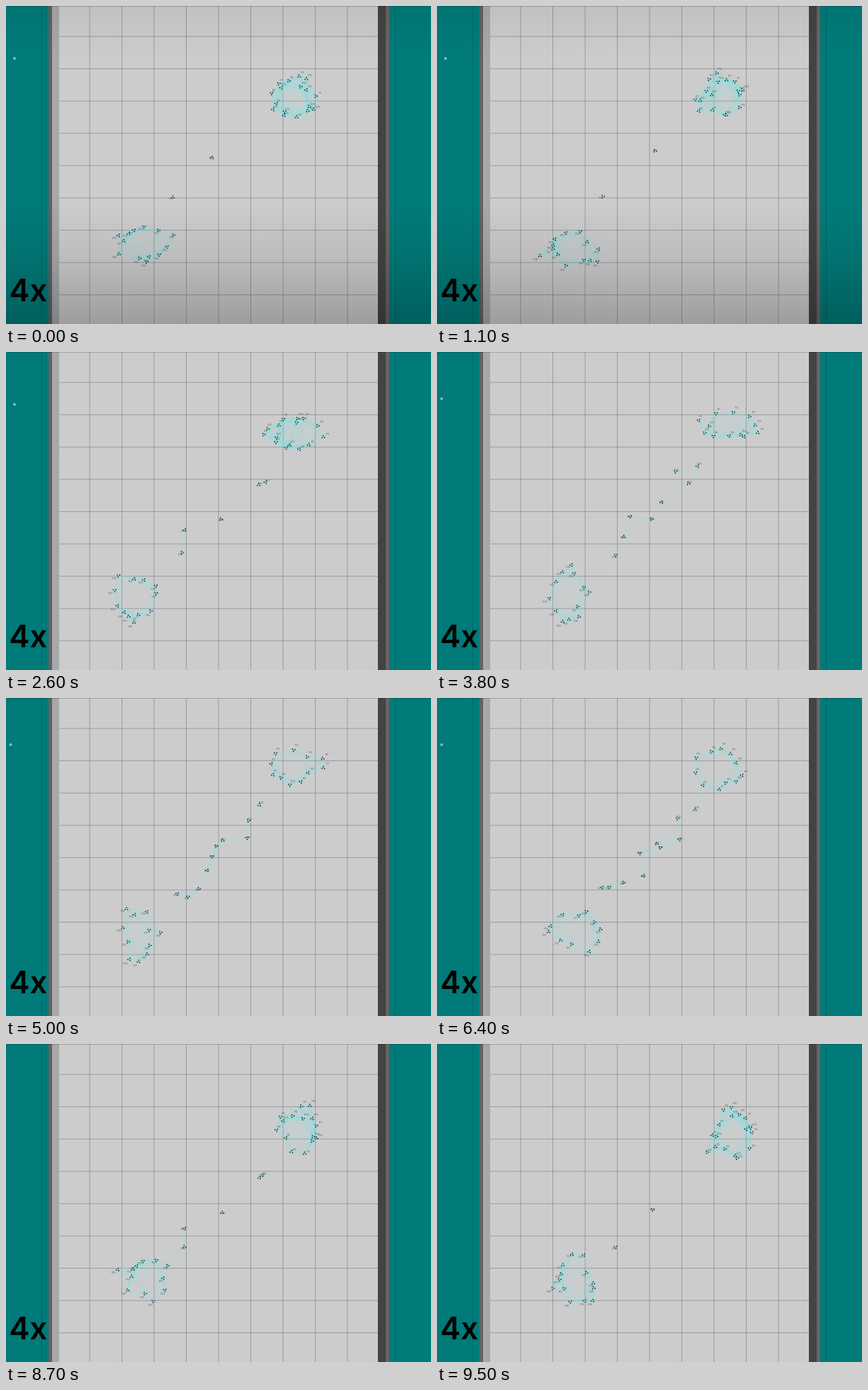
Recreate the animation shown at these times as an HTML page with a canvas. Size 600 by 449 pixels, loop 9600 ms.

```html
<!DOCTYPE html>
<html lang="en">
<head>
<meta charset="utf-8">
<title>Robot swarm</title>
<style>
  html, body { margin: 0; width: 100%; height: 100%; overflow: hidden; background: #007b79; }
  canvas { display: block; }
</style>
</head>
<body>
<canvas width="600" height="449"></canvas>
<script>
const W = 600, H = 449, LOOP = 9600, STEP = 100;
const FLOCK = 11, CHAIN = 10, RANGE = 47, TURN = 2 * Math.PI;
const ctx = document.querySelector('canvas').getContext('2d');
const lerp = (a, b, u) => a + (b - a) * u;
const clamp = u => Math.max(0, Math.min(1, u));
const smooth = u => u * u * (3 - 2 * u);
const wave = (t, mid, amp, peak, period = LOOP) => mid + amp * Math.cos(TURN * (t - peak) / period);

let seed = 7;
function random() {
  seed = (seed * 16807) % 2147483647;
  return seed / 2147483647;
}

const member = () => ({ angle: random() * TURN, reach: 0.45 + 0.65 * Math.sqrt(random()), phase: random() * TURN });
const flocks = [0, 1].map(() => Array.from({ length: FLOCK }, (_, i) => {
  const m = member();
  m.angle = (i + m.angle / TURN) / FLOCK * TURN;
  return m;
}));
// Chain members fill their places along the way from bottom to top in scattered order.
const chain = Array.from({ length: CHAIN }, (_, rank) => ({ ...member(), rank, place: (0.08 + rank * 0.38) % 1 }));

// The two flocks drift and breathe: wide when flat, narrow when tall.
function flockShapes(t) {
  const topHeight = wave(t, 28, 7, 8500), bottomWidth = wave(t, 34, 10, 600, 6900);
  return {
    top: { x: wave(t, 406, 9, 4000, 5600), y: wave(t, 112, 17, 700), rx: 62 - topHeight, ry: topHeight },
    bottom: { x: wave(t, 191, 7, 7900), y: wave(t, 336, 11, 2400), rx: bottomWidth, ry: 70 - bottomWidth }
  };
}

function inFlock(m, shape, t) {
  const angle = m.angle - TURN * t / 8500;
  const reach = m.reach + 0.1 * Math.sin(m.phase + t / 600);
  return { x: shape.x + shape.rx * reach * Math.cos(angle), y: shape.y + shape.ry * reach * Math.sin(angle) };
}

function inChain(m, t) {
  const sway = 10 * Math.sin(m.phase + t / 900);
  return { x: lerp(232, 370, m.place) + sway, y: lerp(288, 158, m.place) + sway };
}

function robotsAt(t) {
  const { top, bottom } = flockShapes(t);
  const joined = wave(t, 6, 4.5, 5600);
  const robots = [
    ...flocks[0].map(m => inFlock(m, top, t)),
    ...flocks[1].map(m => inFlock(m, bottom, t)),
    ...chain.map(m => {
      const home = inFlock(m, m.place > 0.3 ? top : bottom, t), out = inChain(m, t);
      const u = smooth(clamp((joined - m.rank) / 3 + 0.5));
      return { x: lerp(home.x, out.x, u), y: lerp(home.y, out.y, u) };
    })
  ];
  return robots.map((p, i) => ({ ...p, angle: i * 2.4 + t / 700 }));
}

function bar(color, x, y, w, h) {
  ctx.fillStyle = color;
  ctx.fillRect(x, y, w, h);
}

function dot(x, y, r) {
  ctx.beginPath();
  ctx.arc(x, y, r, 0, TURN);
  ctx.fill();
}

function drawArena() {
  bar('#007b79', 0, 0, W, H);
  bar('#006967', 50, 0, 1, H);
  bar('#006967', 549, 0, 1, H);
  bar('#626162', 60, 0, 5, H);
  bar('#a9a8a9', 65, 0, 10, H);
  bar('#cdcccd', 75, 0, 450, H);
  bar('#444344', 525, 0, 11, H);
  bar('#656465', 536, 0, 5, H);
  const line = 'rgba(85,95,95,.45)';
  for (let i = 0; i < 9; i++) {
    bar(line, 117.6 + i * 45.5, 0, 1, H);
    bar(line, 75, 42.5 + i * 45.6, 450, 1);
  }
  bar('rgba(0,0,0,.2)', 0, 0, W, 1);
}

function drawLinks(robots) {
  robots.forEach((a, i) => {
    for (const b of robots.slice(0, i)) {
      const d = Math.hypot(a.x - b.x, a.y - b.y);
      if (d > RANGE) continue;
      const strength = 1 - d / (RANGE + 12);
      for (const [width, alpha] of [[4.5, 0.15], [1, 0.4]]) {
        ctx.lineWidth = width;
        ctx.strokeStyle = `rgba(120,230,228,${alpha * strength})`;
        ctx.beginPath();
        ctx.moveTo(a.x, a.y);
        ctx.lineTo(b.x, b.y);
        ctx.stroke();
      }
    }
  });
}

function drawRobot({ x, y, angle }, i) {
  ctx.fillStyle = 'rgba(120,225,225,.3)';
  dot(x, y, 2.5);
  ctx.fillStyle = '#1c2e30';
  for (let k = 0; k < 3; k++) {
    const a = angle + k * TURN / 3;
    dot(x + 2 * Math.cos(a), y + 1.8 * Math.sin(a), 0.9);
  }
  // Labels float above the floor, so they lean away from the camera's centre.
  ctx.fillStyle = 'rgba(45,55,55,.65)';
  ctx.font = '3.5px Inter, sans-serif';
  ctx.textAlign = 'center';
  ctx.fillText('R' + (i + 1), x + (x - 300) * 0.042, y + (y - 225) * 0.042 + 1);
}

function drawShade(alpha) {
  const g = ctx.createLinearGradient(0, 0, 0, H);
  g.addColorStop(0, `rgba(0,0,0,${0.06 * alpha})`);
  g.addColorStop(0.16, 'rgba(0,0,0,0)');
  g.addColorStop(0.62, 'rgba(0,0,0,0)');
  g.addColorStop(0.8, `rgba(0,0,0,${0.08 * alpha})`);
  g.addColorStop(1, `rgba(0,0,0,${0.23 * alpha})`);
  bar(g, 0, 0, W, H);
}

function draw(now) {
  const t = Math.floor(now % LOOP / STEP) * STEP;
  const robots = robotsAt(t);
  drawArena();
  drawLinks(robots);
  robots.forEach(drawRobot);
  if (t < 7500) {
    ctx.fillStyle = '#8fb9b9';
    if (t < 3600) dot(12, 74, 2);
    else dot(6.5, 66, 2);
  }
  drawShade(clamp((1800 - t) / 400));
  ctx.fillStyle = '#000';
  ctx.font = '600 43.5px Inter, sans-serif';
  ctx.textAlign = 'left';
  ctx.fillText('4x', 4.5, 417);
  requestAnimationFrame(draw);
}
requestAnimationFrame(draw);
</script>
</body>
</html>
```
